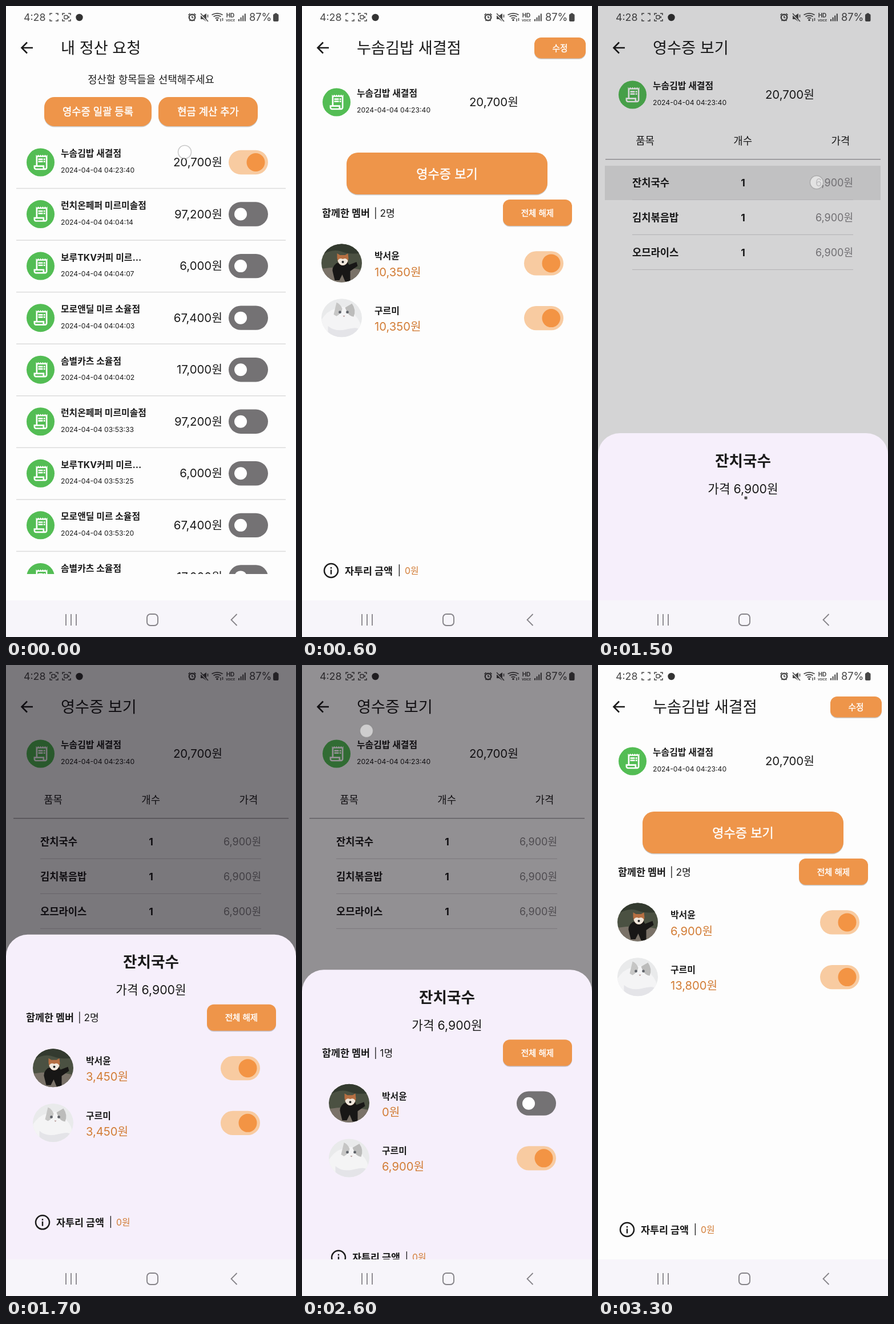
Animation, 508 px wide and 1102 px high, one loop 4300 ms. Source, as an HTML page:

```html
<!DOCTYPE html>
<html lang="ko">
<head>
<meta charset="utf-8">
<title>정산 요청</title>
<style>
  html, body { margin: 0; width: 100%; height: 100%; overflow: hidden; background: #fdfdfd; }
  svg { display: block; width: 100vw; height: 100vh; }
  text { font-family: Inter, "Noto Sans CJK KR", "Noto Sans CJK", sans-serif; white-space: pre; }
  .label { stroke: #fff; stroke-width: .45px; }
</style>
</head>
<body>
<svg id="stage" viewBox="0 0 508 1102">
  <defs>
    <clipPath id="oval"><ellipse rx="35.5" ry="33.5"/></clipPath>
    <clipPath id="listBox"><rect y="200" width="508" height="792"/></clipPath>
    <g id="receipt">
      <circle r="24.5" fill="#53bd54"/>
      <path transform="scale(1.33) translate(-12 -12)" fill="#fff" fill-rule="evenodd" d="M19.5 3.5L18 2l-1.5 1.5L15 2l-1.5 1.5L12 2l-1.5 1.5L9 2 7.5 3.5 6 2v14H3v3c0 1.66 1.34 3 3 3h12c1.66 0 3-1.34 3-3V2zM15 20H6c-.55 0-1-.45-1-1v-1h10zm4-1c0 .55-.45 1-1 1s-1-.45-1-1v-3H8V5h11zM9 7h6v2H9zM16 7h2v2h-2zM9 10h6v2H9zM16 10h2v2h-2z"/>
    </g>
    <g id="panda" clip-path="url(#oval)">
      <rect x="-36" y="-34" width="72" height="68" fill="#4b5142"/>
      <path d="M-36 -14Q-15 -26 0 -20T36 -18V-34H-36Z" fill="#333a2f"/>
      <path d="M-36 10Q0 4 36 12V34H-36Z" fill="#7a7268"/>
      <path d="M-9 0Q-19 8 -15 18L-12 30H-4L1 20L6 32H15L15 14L28 5L26 -2L13 3L10 -2Z" fill="#181716"/>
      <path d="M-8 -9L-8 -17L-3 -14H6L11 -17L12 -8Q10 4 2 4Q-6 4 -8 -9Z" fill="#b66f42"/>
      <path d="M-7 -4Q-4 -10 2 -7Q8 -10 11 -4Q8 4 2 4Q-4 4 -7 -4Z" fill="#efe7dc"/>
      <circle cx="2" cy="-2" r="2" fill="#222"/>
    </g>
    <g id="cat" clip-path="url(#oval)">
      <rect x="-36" y="-34" width="72" height="68" fill="#e9eaeb"/>
      <path d="M-36 34V4Q-26 -12 -12 -16Q16 -26 24 -4Q36 8 36 34Z" fill="#f4f4f5"/>
      <path d="M-14 -6L-9 -27Q-2 -24 1 -16Q0 -8 -9 -3Z" fill="#c6c6c5"/>
      <path d="M6 -18L18 -25Q26 -14 21 -2Q13 -3 9 -11Z" fill="#bcbcbb"/>
      <path d="M-24 14Q-12 25 8 20T30 20V34H-24Z" fill="#e4e4e8"/>
      <circle cx="-3" cy="-10" r="2.4" fill="#60646a"/>
      <circle cx="10" cy="-10" r="2.4" fill="#60646a"/>
      <path d="M2 -4h4l-2 2.500z" fill="#b59a97"/>
    </g>
  </defs>
  <g id="screen"></g>
</svg>
<script>
const LOOP = 4300, TICK = 100;
const ORANGE = '#ee954a', AMOUNT = '#d27c35', INK = '#1b1b1b', PAPER = '#fdfdfd', SCRIM = '#050108';
const SHOP = '누솜김밥 새결점', STAMP = '2024-04-04 04:23:40';
const PEOPLE = [['panda', '박서윤'], ['cat', '구르미']];

const shops = [
  [SHOP, '04:23:40', '20,700'],
  ['런치온페퍼 미르미솔점', '04:04:14', '97,200'],
  ['보루TKV커피 미르...', '04:04:07', '6,000'],
  ['모로앤딜 미르 소율점', '04:04:03', '67,400'],
  ['솜별카츠 소율점', '04:04:02', '17,000'],
  ['런치온페퍼 미르미솔점', '03:53:33', '97,200'],
  ['보루TKV커피 미르...', '03:53:25', '6,000'],
  ['모로앤딜 미르 소율점', '03:53:20', '67,400'],
  ['솜별카츠 소율점', '03:53:18', '17,000']
];

// start, end, x, y
const taps = [
  [0, 400, 313, 255], [900, 1100, 324, 285], [1500, 1600, 383, 308],
  [2000, 2300, 418, 688], [2600, 2700, 113, 115], [2900, 3100, 37, 73]
];

const clamp = v => Math.max(0, Math.min(1, v));
const mix = (a, b, k) => a + (b - a) * k;

const text = (x, y, s, size, { w = 400, fill = INK, a = 'start', cls = '' } = {}) =>
  `<text class="${cls}" x="${x}" y="${y}" font-size="${size}" font-weight="${w}" fill="${fill}" text-anchor="${a}">${s}</text>`;
const rect = (x, y, w, h, fill, r = 0, more = '') =>
  `<rect x="${x}" y="${y}" width="${w}" height="${h}" rx="${r}" fill="${fill}" ${more}/>`;
const circle = (x, y, r, fill, more = '') => `<circle cx="${x}" cy="${y}" r="${r}" fill="${fill}" ${more}/>`;
const stroke = (d, color, w, more = '') =>
  `<path d="${d}" fill="none" stroke="${color}" stroke-width="${w}" ${more}/>`;
const use = (id, x, y) => `<use href="#${id}" x="${x}" y="${y}"/>`;
const group = (attrs, s) => `<g ${attrs}>${s}</g>`;

const button = (x, y, w, h, r, label, size) =>
  rect(x, y + 1.5, w, h, '#000', r, 'opacity=".2"') + rect(x, y, w, h, ORANGE, r) +
  text(x + w / 2, y + h / 2 + size * 0.38, label, size, { fill: '#fff', a: 'middle', cls: 'label' });

const blend = (a, b, k) => `rgb(${a.map((v, i) => Math.round(mix(v, b[i], k)))})`;
const toggle = (x, y, on) =>
  rect(x, y - 21.2, 69, 42.4, blend([116, 114, 116], [248, 203, 161], on), 21.2) +
  circle(x + mix(21, 47.5, on), y, mix(11, 16, on), blend([255, 255, 255], [243, 148, 68], on));

const topBar = title =>
  stroke('M47 73H28M37 63.5L27.5 73L37 82.5', INK, 2.6) + text(96, 83, title, 27.2);

const summary = (y, name, date, sum) =>
  use('receipt', 60.5, y) + text(96, y - 9.6, name, 15.9, { w: 700 }) +
  text(96, y + 18, date, 12.2) + text(379, y + 7, sum + '원', 20.4, { a: 'end' });

const spinner = (x, y) => rect(x - 2.5, y - 2.5, 5, 5, '#555', 1);

function listPage(pressed) {
  let rows = pressed ? rect(18, 228, 472, 90, '#000', 0, 'opacity=".07"') : '';
  shops.forEach(([name, time, sum], i) => {
    const y = 273 + i * 90.55;
    rows += summary(y, name, '2024-04-04 ' + time, sum) + toggle(390, y, i ? 0 : 1) +
      rect(18, y + 44.8, 472, 1.5, '#dcdcdc');
  });
  return topBar('내 정산 요청') +
    text(254, 135, '정산할 항목들을 선택해주세요', 17.7, { a: 'middle' }) +
    button(67, 159, 188, 51, 18, '영수증 일괄 등록', 17.7) +
    button(267, 159, 174, 51, 18, '현금 계산 추가', 17.7) +
    group('clip-path="url(#listBox)"', rows);
}

// Member block shared by the detail page and the sheet.
function members(dy, dx, sums, on, restY) {
  let s = text(35, 367.5 + dy, '함께한 멤버', 17.4, { w: 700 }) +
    text(126, 367.5 + dy, `| ${on > 0.5 ? 2 : 1}명`, 17.2) +
    button(352, 338 + dy, 121, 46, 12, '전체 해제', 14.5);
  PEOPLE.forEach(([pic, name], i) => {
    const y = 449 + dy + i * 95.7;
    s += use(pic, 69.5 + dx, y) + text(127 + dx, y - 6.6, name, 15.9, { w: 700 }) +
      text(127 + dx, y + 22.5, sums[i] + '원', 20.2, { fill: AMOUNT }) +
      toggle(389 - dx, y + 0.4, i ? 1 : on);
  });
  return s + circle(51 + dx, restY, 12, 'none', `stroke="${INK}" stroke-width="2.5"`) +
    rect(49.8 + dx, restY - 1.5, 2.4, 8, INK) + rect(49.8 + dx, restY - 6, 2.4, 2.6, INK) +
    text(75 + dx, restY + 6.5, '자투리 금액', 17.4, { w: 700 }) +
    text(167.5 + dx, restY + 6, '|', 17.4) +
    text(180 + dx, restY + 5.5, '0원', 15.8, { fill: AMOUNT });
}

const detailPage = (sums, pressed) =>
  topBar(SHOP) + button(407, 55, 90, 36.5, 12, '수정', 14.6) +
  summary(168, SHOP, STAMP, '20,700') +
  button(78, 256, 352, 73, 20, '영수증 보기', 22) +
  (pressed ? rect(78, 256, 352, 73, '#fff', 20, 'opacity=".15"') : '') +
  members(0, 0, sums, 1, 986);

function receiptPage(pressed) {
  let s = topBar('영수증 보기') + summary(155, SHOP, STAMP, '20,700') +
    rect(13, 267, 482, 1.5, '#a9a7aa') +
    (pressed ? rect(12, 279, 483, 60, '#000', 0, 'opacity=".09"') : '');
  ['품목', '개수', '가격'].forEach((h, i) =>
    s += text(82.5 + i * 171.2, 241.5, h, 17.8, { a: 'middle' }));
  ['잔치국수', '김치볶음밥', '오므라이스'].forEach((dish, i) => {
    const y = 308.5 + i * 61;
    s += text(60, y + 6.5, dish, 17.7, { w: 700 }) + text(254, y + 6, '1', 17.7, { w: 700, a: 'middle' }) +
      text(447, y + 6, '6,900원', 18, { fill: '#858386', a: 'end' }) +
      rect(60, y + 29.3, 387, 1.2, '#d9d7da');
  });
  return s;
}

function sheet(p, t) {
  const off = t >= 2200;
  const on = 1 - clamp((t - 2100) / 200);
  return group(`transform="translate(0 ${584 * (1 - p)})"`,
    rect(0, 454, 508, 700, '#f6effb', 38) +
    text(254, 511.5, '잔치국수', 26.6, { w: 700, a: 'middle' }) +
    text(254, 558.5, '가격 6,900원', 21.3, { a: 'middle' }) +
    (t < 1600 ? spinner(259, 567)
      : members(238, 13, off ? ['0', '6,900'] : ['3,450', '3,450'], off ? Math.min(on, 0.5) : 1, 956.5)));
}

function status(recording) {
  const c = '#474747';
  const brackets = x => stroke(`M${x - 7} 16v-3h4M${x + 3} 13h4v3M${x + 7} 23v3h-4M${x - 3} 26h-4v-3`, c, 1.5);
  const camera = x => rect(x - 4, 16.5, 6, 6, 'none', 1, `stroke="${c}" stroke-width="1.4"`) +
    `<path d="M${x + 2} 19.5l3-2v4z" fill="${c}"/>`;
  let s = text(31, 26, '4:28', 17.8, { fill: c }) + brackets(84) + brackets(106) + camera(106) +
    (recording ? camera(84) : '') + circle(128.5, 20, 6.2, '#333');
  s += circle(326, 20, 5.2, 'none', `stroke="${c}" stroke-width="2.4"`) +
    stroke('M326 17v3.5h2.5M319.5 16l3-3M332.5 16l-3-3M321.5 26l1.5-1.8M330.5 26l-1.5-1.8', c, 1.6);
  s += `<path d="M341 17h4l6-4v14l-6-4h-4z" fill="${c}"/>` +
    stroke('M340 13L353 27', '#fff', 2.6) + stroke('M341 13L354 27M353.5 15v5', c, 1.5);
  [9.5, 6.5, 3.5].forEach(r =>
    s += stroke(`M${370 - r} ${25 - r}Q370 ${25 - r * 1.55} ${370 + r} ${25 - r}`, c, 1.8));
  s += circle(370, 24.5, 1.8, c) + stroke('M376 27v-5M379.5 21v5', c, 1.4);
  s += text(393, 20, 'HD', 10, { w: 700, fill: c, a: 'middle' }) +
    text(393, 26.5, 'VOICE', 5.2, { w: 700, fill: c, a: 'middle' });
  for (let i = 0; i < 4; i++) s += rect(407 + i * 3.6, 23 - i * 3.2, 2, 3.5 + i * 3.2, c);
  return s + text(426, 26, '87%', 18.2, { fill: c }) +
    rect(468, 14, 9.5, 13, c, 2) + rect(470.5, 12.5, 4.5, 3, c, 1);
}

const navBar = rect(0, 1038, 508, 64, '#f7f5fa') +
  stroke('M105 1062v20M114 1062v20M123 1062v20M404.5 1062L394.5 1072L404.5 1082', '#858388', 1.8) +
  rect(247, 1062, 19, 20, 'none', 6, 'stroke="#858388" stroke-width="1.9"');

const scaled = (s, k, opacity = 1) =>
  group(`transform="translate(254 519) scale(${k}) translate(-254 -519)" opacity="${opacity}"`,
    rect(0, 0, 508, 1038, PAPER) + s);

// Zoom transition: the upper page grows in over a dimmed lower page.
const zoom = (under, over, k, opacity = 1) =>
  scaled(under, 1 + 0.04 * opacity) +
  rect(0, 0, 508, 1038, SCRIM, 0, `opacity="${0.29 * opacity}"`) + scaled(over, k, opacity);
const grow = n => 1 - 0.15 * Math.exp(-1.4 * n);

function pages(t) {
  const before = ['10,350', '10,350'], after = ['6,900', '13,800'];
  const blank = spinner(254, 495);
  if (t < 400) return listPage(t >= 300);
  if (t < 600) return zoom(listPage(true), t < 500 ? blank : detailPage(before), grow((t - 300) / 100));
  if (t < 1000) return detailPage(before, t >= 900);
  if (t < 1200) return zoom(detailPage(before), t < 1100 ? blank : receiptPage(), grow((t - 900) / 100));
  if (t < 3000) return receiptPage(t >= 1500 && t < 1700);
  if (t < 3200) {
    const k = (t - 2900) / 100;
    return zoom(detailPage(before), receiptPage(), 1 - 0.035 * k, 1 - 0.35 * k);
  }
  return detailPage(after);
}

function sheetOpen(t) {
  if (t < 1500 || t >= 2800) return 0;
  if (t < 2000) return 1 - 0.5 * Math.exp((1500 - t) / 70);
  return t < 2600 ? 1 : clamp(1 - 0.134 * ((t - 2500) / 100) ** 2.3);
}

function pointer(t) {
  const tap = taps.find(([a, b]) => t >= a && t < b);
  if (!tap) return '';
  const [, , x, y] = tap;
  const onSwitch = t >= 2000 && t < 2300 ? circle(x + 1, y, 20, '#f3943e', 'opacity=".35"') : '';
  return onSwitch + circle(x, y, 11.5, '#fff', 'fill-opacity=".55" stroke="#777" stroke-opacity=".4" stroke-width="1.5"');
}

function draw(t) {
  const p = sheetOpen(t);
  return rect(0, 0, 508, 1102, PAPER) + pages(t) + status(t >= 1600 && t < 2700) +
    (p ? rect(0, 0, 508, 1038, SCRIM, 0, `opacity="${0.555 * p ** 1.78}"`) + sheet(p, t) : '') +
    pointer(t) + navBar;
}

const screen = document.getElementById('screen');
const start = performance.now();
let shown = -1;
function frame() {
  const t = Math.floor(((performance.now() - start) % LOOP) / TICK) * TICK;
  if (t !== shown) screen.innerHTML = draw(shown = t);
  requestAnimationFrame(frame);
}
frame();
</script>
</body>
</html>
```
